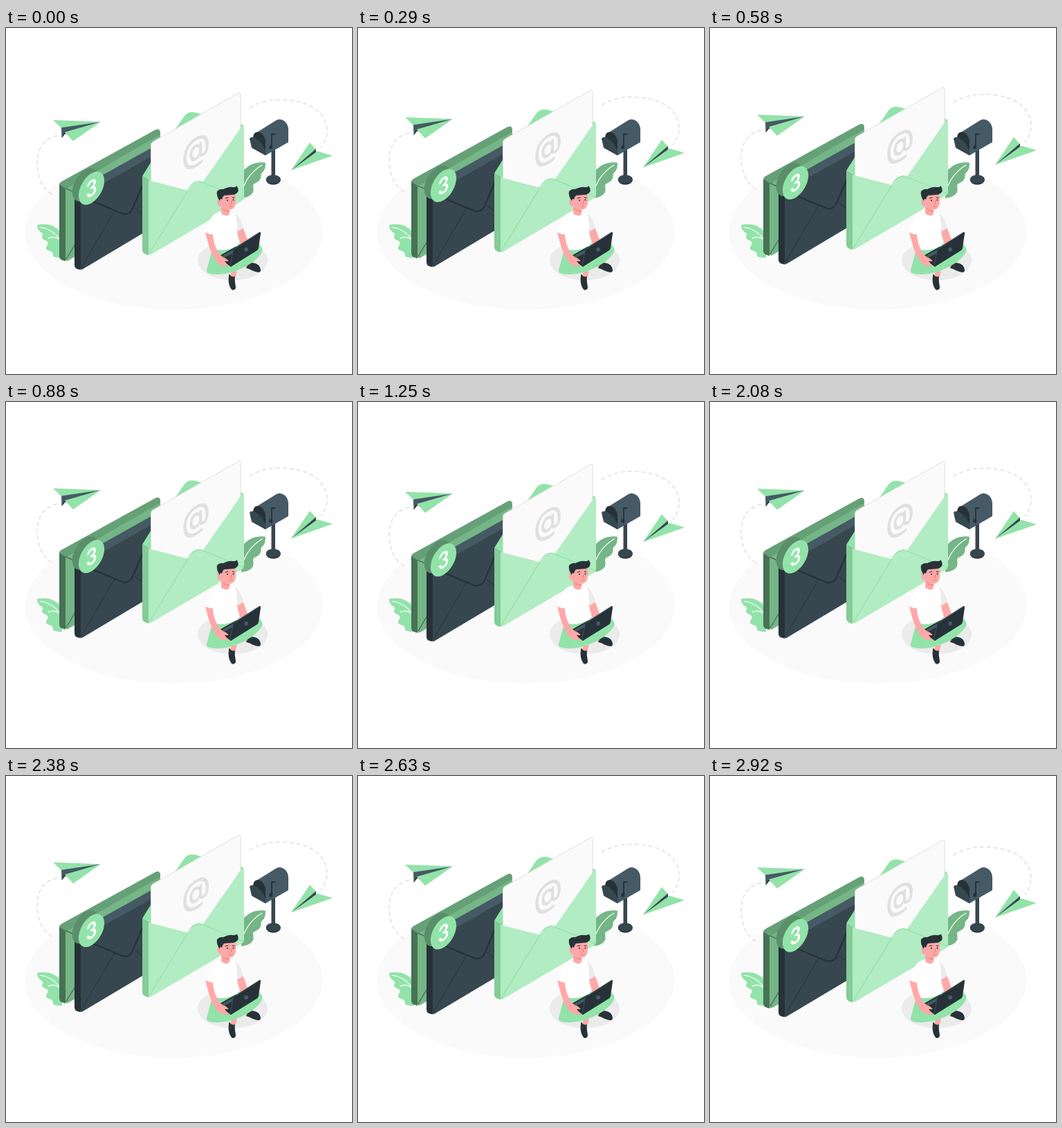
These frames come from a looping animation (500x500 px, 2.96 s). An HTML page:

```html
<!DOCTYPE html>
<html lang="en">
<head>
<meta charset="utf-8">
<title>Floating mail</title>
<style>
html, body { margin: 0; width: 100%; height: 100%; overflow: hidden; background: #fff; }
svg { display: block; width: 100vw; height: 100vh; }
.mint { fill: #92e3a9; }
.pale { fill: #b2ecc2; }
.mid { fill: #75b687; }
.ink { fill: #263238; }
.slate { fill: #37474f; }
.steel { fill: #455a64; }
.skin { fill: #ffa8a7; }
.line { fill: none; stroke-linecap: round; stroke-linejoin: round; }
.dash { fill: none; stroke: #e0e0e0; stroke-width: 1.5; stroke-dasharray: 6 4; }
text { text-anchor: middle; }
</style>
</head>
<body>
<svg viewBox="0 0 500 500">
  <ellipse cx="242.5" cy="295" rx="215" ry="112" fill="#fafafa"/>

  <!-- leaves -->
  <path class="mint" d="M45 285C50 283 60 283 67 286C74 289 78 293 81 298V332C75 332 69 332 68 329C67 326 69 325 65 323C60 321 57 320 58 317C60 313 62 311 59 308C55 306 52 305 52 302C53 299 55 298 50 295Q45 291 45 285Z"/>
  <g class="line" stroke="#fff" stroke-width="1.2">
    <path d="M49 288Q67 290 78 306"/>
    <path d="M61 304Q69 300 76 305"/>
  </g>
  <path class="mid" d="M340 246V210C345 203 352 197 361 195C368 194 374 194 375 195C375 201 374 206 370 209C367 212 370 215 367 219C364 224 357 224 357 228C358 234 358 238 354 241C350 244 347 245 340 246Z"/>
  <path class="line" d="M342 233Q350 210 370 198" stroke="#fff" stroke-width="1.2"/>

  <g id="float">
    <path class="dash" d="M74 154.500C54 159 45 174 45 194C45 214 53 234 70 241"/>
    <path class="dash" d="M352 114.500C371 102 396 100 420 105C448 110 464 128 464 148Q464 160 455 172"/>

    <!-- left paper plane -->
    <path class="mint" d="M68 132L137 134.500L80 143.500Z"/>
    <path class="steel" d="M80 143L137 134.500L86 151L80.500 158Z"/>
    <path class="ink" d="M80.500 158L84 150L88 154L86 151Z"/>
    <path class="mint" d="M137 134.500L97 162.500L85 149.500Z"/>

    <!-- right paper plane -->
    <path class="mint" d="M439 164.500L412 204.500L448 174.500Z"/>
    <path class="slate" d="M448 173.500L412 204.500L448 181Z"/>
    <path class="mint" d="M412 204.500L450 177L472 183.500Z"/>

    <!-- back envelope -->
    <path fill="#66a077" d="M77 225Q77 223 80 221L216 146Q223 143 223 151V159L86 235Z"/>
    <path class="mid" d="M86 232L223 153V258L90 335Q86 337 86 332Z"/>
    <path fill="#497155" d="M77 225L86 231V336L80 334Q77 332 77 329Z"/>
    <path class="line" d="M87 333L108 298M87 231L102 238" stroke="#497155" stroke-width="1.4"/>

    <!-- dark envelope -->
    <path class="steel" d="M99 237Q99 234 103 232L214 170L224 174V184L108 246Z"/>
    <path class="slate" d="M108 242L224 177V280L110 348Q108 349 108 345Z"/>
    <path class="ink" d="M99 236L108 241V348.500L102 347Q99 345 99 342Z"/>
    <path class="line" d="M109 345L157 263M186 259L209 276" stroke="#263238" stroke-width="1"/>
    <path class="line" d="M108 242L165 266Q176 271 182 262L213 190" stroke="#263238" stroke-width="2.200"/>

    <!-- badge -->
    <g transform="matrix(.866 -.5 0 1 123.500 230.500)">
      <path fill="#5b8e6a" d="M0 21.500L-10.400 11.300A21.500 21.500 0 0 1 -10.400 -31.700L0 -21.500Z"/>
      <circle cx="-10.400" cy="-10.200" r="21.500" fill="#5b8e6a"/>
      <circle class="mint" r="21.500"/>
      <text y="11.300" fill="#fff" font-family="Lato, sans-serif" font-size="32" font-weight="700">3</text>
    </g>

    <!-- open envelope -->
    <path class="mint" d="M209 193L249 139L258 126Q264 119 273 121L284 124L340 138Q344 139 344 144V200L209 260Z"/>
    <path class="mint" d="M197 213L210 192V224L206 219Z"/>
    <path d="M209.500 168Q209.500 165 212 163.500L336 93Q339 91.500 339 95V205L264 240L209.500 222Z" fill="#fafafa" stroke="#dedede" stroke-width="1"/>
    <g transform="matrix(.866 -.5 0 1 274.500 176.500)">
      <text y="14" fill="#e0e0e0" font-family="Inter, sans-serif" font-size="47" font-weight="600">@</text>
    </g>
    <path class="pale" d="M206 219L264 234L270 225Q275 219 285 221L340 142Q344 138 344 143V244Q344 247 341 249L210 326Q206 328 206 324Z"/>
    <path fill="#83cc98" d="M197 213L206 219V327.500L200 325Q197 323 197 320Z"/>
    <path class="line" d="M207 325L264 232Q271 219 282 221L343 246" stroke="#92e3a9" stroke-width="1.300"/>
  </g>

  <!-- mailbox -->
  <ellipse class="ink" cx="386.300" cy="220" rx="10.500" ry="6.500"/>
  <ellipse class="slate" cx="386.300" cy="218.500" rx="10.500" ry="6.300"/>
  <path class="slate" d="M383.500 170H389V218Q386.300 220 383.500 218Z"/>
  <path class="steel" d="M359 153L391 133Q397 130 403 135Q408 140 408 147V165L375 184L361 173Z"/>
  <path class="ink" d="M357 174V160C357 149 365 148 371 154Q375 159 375 165V184Z"/>
  <path class="slate" d="M352 160Q354 156 360 159Q371 165 375 178V184L355 173Z"/>
  <path class="line" d="M384 172V153L388.500 153.500" stroke="#263238" stroke-width="1.800"/>
  <ellipse class="ink" cx="383" cy="172" rx="2.500" ry="3"/>

  <!-- reader -->
  <ellipse cx="327.500" cy="336" rx="50.500" ry="28.500" fill="#ebebeb"/>
  <path class="skin" d="M326 350L334 352L331 361H324ZM343 341L349 337L353 344L348 348Z"/>
  <path class="ink" d="M322.500 355Q326 361 331 359C330 366 332 371 332 376Q330 380 326 378C321 371 321 364 322.500 355Z"/>
  <path class="ink" d="M348 338C354 340 361 338 366 344Q370 351 366 353C358 353 353 348 347 347Q350 343 348 338Z"/>
  <path class="mint" d="M301 316L337 312L366 313Q372 317 370 323C364 336 345 347 327 353Q309 358 294 355Q288 354 291 346C294 337 296 322 301 316Z"/>
  <path class="skin" d="M332 290L342 287L349 306L339 313Z"/>
  <path fill="#fff" d="M310 265Q302 267 298 272C293 280 289 288 288 295Q293 299 299 298L302 320Q320 324 336 313L334 294L343 289C342 279 337 270 331 266L322 265Z"/>
  <path fill="#ebebeb" d="M331 267C338 273 342 281 343 289L334 294Q335 280 331 267Z"/>
  <path class="skin" d="M311 256H323V269Q319 274 311 268Z"/>
  <path class="skin" d="M309 239L331 237C333 248 333 257 328 261Q318 266 311 258Q305 257 305 250Q306 245 310 248Z"/>
  <path fill="#f28f8f" d="M311 259Q316 264 323 263V266Q315 266 311 259Z"/>
  <path class="ink" d="M309 250C306 246 304 241 305 236Q309 232 314 233Q322 229 328 230Q333 230 333 228Q337 232 335 237Q332 241 327 241L315 242Q313 244 312 248Q309 245 309 250Z"/>
  <circle class="ink" cx="320" cy="249" r="1.100"/>
  <circle class="ink" cx="328.500" cy="248.500" r="1.100"/>
  <g class="line" stroke-width="1">
    <path d="M317 246L321 245M327 245L330 245.500" stroke="#263238"/>
    <path d="M325 249L326.500 254L324 254M322 258Q325 259 327 257" stroke="#e77f7f"/>
  </g>

  <!-- laptop -->
  <path class="ink" d="M305 331L332 316L345 323L325 345Z"/>
  <path class="steel" d="M309 331L331 319L335 321L314 333Z"/>
  <path class="ink" d="M330 318L366 295Q368 294 368 297L365 318Q364 321 362 322L325 345Q323 345 324 342L328 321Z"/>
  <path class="line" d="M324 343L328.500 320L366 296" stroke="#455a64" stroke-width=".8"/>
  <circle class="steel" cx="347" cy="320" r="3"/>
  <path class="skin" d="M288 295Q293 299 299 298C299 306 302 316 306 323Q311 331 318 333L322 337L316 337L321 343Q319 346 311 343C300 338 294 319 288 295Z"/>
</svg>
<script>
// A 1.5 s bob, cut slightly short by the 2.96 s loop.
const loop = 2960, half = 750, lift = 10, rest = 1;
const steps = [0, half, 2 * half, 3 * half, loop];
const shift = t => rest - lift * (1 - Math.abs(t % (2 * half) / half - 1));

document.getElementById("float").animate(
  steps.map(t => ({ offset: t / loop, transform: `translate(0px, ${shift(t)}px)` })),
  { duration: loop, iterations: Infinity, easing: "linear" }
);
</script>
</body>
</html>
```
